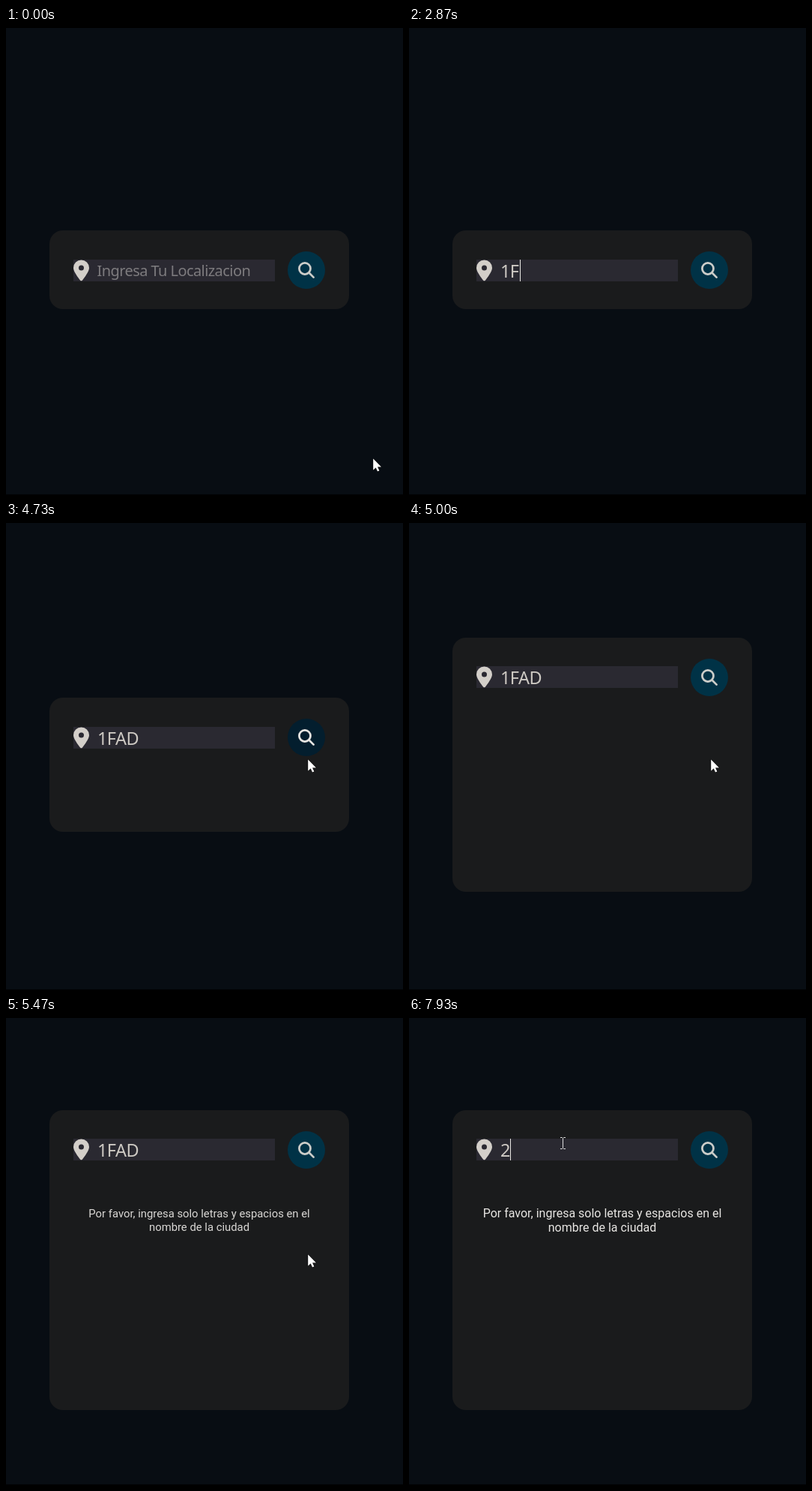
These frames come from a looping animation (530x623 px, 8 s). An HTML page:

```html
<!DOCTYPE html>
<html lang="es">
<head>
<meta charset="utf-8">
<title>Buscador</title>
<style>
html, body { margin: 0; width: 100%; height: 100%; overflow: hidden; background: #080d13; }
svg { display: block; width: 530px; height: 623px; cursor: default; user-select: none; }
.field { font-family: "Noto Sans", "Open Sans", sans-serif; }
#hint { font-size: 20px; letter-spacing: -0.57px; fill: #7d7b7e; }
#value { font-size: 23.5px; letter-spacing: -0.6px; fill: #cdc9c3; }
#error { font: 16px Roboto, sans-serif; fill: #e8e6e3; text-anchor: middle; }
.pointer path { fill: #fff; stroke: #000; stroke-width: 1; paint-order: stroke; stroke-linejoin: round; }
</style>
</head>
<body>
<svg viewBox="0 0 530 623">
  <rect width="530" height="623" fill="#080d13"/>
  <rect y="622" width="530" height="1" fill="#020305"/>
  <rect id="card" x="58" width="400" rx="18" fill="#1a1b1c"/>

  <g id="input">
    <rect x="90" width="269" height="29" fill="#2a2931"/>
    <rect id="selection" x="122" width="55" height="29" fill="#004daa"/>
    <path transform="translate(90 .4) scale(.0547)" fill="#d3cfc9" fill-rule="evenodd"
      d="M216 499C267 435 384 279 384 192A192 192 0 0 0 0 192C0 279 117 435 168 499C181 515 204 515 216 499ZM192 128a64 64 0 1 1 0 128a64 64 0 1 1 0-128Z"/>
    <text id="hint" class="field" x="121.5" y="22">Ingresa Tu Localizacion</text>
    <text id="value" class="field" x="122" y="24"></text>
    <rect id="caret" width="1" height="29" fill="#e8e6e3"/>
  </g>

  <g id="button">
    <circle id="disc" cx="401" cy="25" r="25"/>
    <g id="lens" transform="translate(390 14)" fill="none" stroke-width="2.75" stroke-linecap="round">
      <circle cx="8.95" cy="8.95" r="7.55"/>
      <path d="M14.5 14.5L20.6 20.6"/>
    </g>
  </g>

  <g id="error">
    <text y="-3.5">Por favor, ingresa solo letras y espacios en el</text>
    <text y="15.5">nombre de la ciudad</text>
  </g>

  <g id="pointer" class="pointer">
    <path id="arrow" d="M.2 .5V15.8L3.7 12.5L6 17.5L8.4 16.4L6.1 11.5H11Z"/>
    <path id="hand" d="M-1.5 1Q0-1 1.5 1V7L8.5 8.5Q10.5 9 10.5 11V15L8.5 21H-1L-6.5 13.5Q-6.5 11-4 12L-1.5 14Z"/>
    <g id="beam" fill="none">
      <path d="M-3 -7.5H-.5L.5 -6.5L1.5 -7.5H4M.5 -6.5V6.5M-3 7.5H-.5L.5 6.5L1.5 7.5H4"
        style="fill:none;stroke:#dcdcdc;stroke-width:1"/>
    </g>
  </g>
</svg>
<script>
const LOOP = 8000, MIDDLE = 322.5;
const OPEN = 4634, ERROR = OPEN + 500;

// [start, text]
const typed = [[0, ""], [2530, "1"], [2870, "1F"], [3270, "1FA"], [3470, "1FAD"], [7930, "2"]];
// [on, off, x]
const blinks = [
  [470, 1000, 122], [1470, 2070, 122], [2530, 2600, 135], [2870, 3130, 148],
  [3270, 3470, 161], [3470, 3670, 177], [4200, 4600, 177], [6930, 7130, 177], [7930, 8000, 135]
];
// [time, x, y]
const track = [
  [0, 490, 574], [420, 255, 323], [4000, 255, 323], [4070, 269, 311], [4530, 403, 315],
  [5870, 403, 315], [6200, 200, 187], [6470, 200, 187], [6600, 205, 167], [8000, 205, 167]
];

const ids = "card input selection hint value caret button disc lens error pointer arrow hand beam".split(" ");
const el = Object.fromEntries(ids.map(id => [id, document.getElementById(id)]));

const clamp = v => Math.min(1, Math.max(0, v));
const span = (t, start, length) => clamp((t - start) / length);
const smooth = u => u * u * (3 - 2 * u);
const set = (node, name, value) => node.setAttribute(name, value);
const show = (node, on) => set(node, "visibility", on ? "inherit" : "hidden");
const mix = (a, b, u) => `rgb(${a.map((v, i) => Math.round(v + (b[i] - v) * u))})`;

function bezier(x1, y1, x2, y2) {
  const at = (a, b, s) => 3 * (1 - s) * (1 - s) * s * a + 3 * (1 - s) * s * s * b + s * s * s;
  return x => {
    if (x <= 0 || x >= 1) return clamp(x);
    let lo = 0, hi = 1;
    for (let i = 0; i < 24; i++) {
      const mid = (lo + hi) / 2;
      if (at(x1, x2, mid) < x) lo = mid; else hi = mid;
    }
    return at(y1, y2, lo);
  };
}
const ease = bezier(.25, .1, .25, 1);
const easeOut = bezier(0, 0, .58, 1);

function step(t) {
  const time = k => 10 * Math.round(k * 100 / 15);
  let k = Math.floor((t + 4) * .015);
  if (time(k) > t) k--;
  return time(k);
}

function mouseAt(t) {
  let i = 1;
  while (i < track.length - 1 && track[i][0] < t) i++;
  const [t0, x0, y0] = track[i - 1], [t1, x1, y1] = track[i];
  const u = smooth(span(t, t0, t1 - t0));
  return [Math.round(x0 + (x1 - x0) * u), Math.round(y0 + (y1 - y0) * u)];
}

function drawField(t, y) {
  const text = typed.filter(([start]) => t >= start).pop()[1];
  const blink = blinks.find(([on, off]) => t >= on && t < off);
  const selected = t >= 7130 && t < 7930;
  set(el.input, "transform", `translate(0 ${y})`);
  el.value.textContent = text;
  el.value.style.fill = selected ? "#e8e6e3" : "";
  show(el.hint, !text);
  show(el.selection, selected);
  show(el.caret, blink);
  if (blink) set(el.caret, "x", blink[2]);
}

function drawButton(t, y) {
  const hover = ease(span(t, 4320, 200)) * (1 - ease(span(t, 4710, 300)));
  set(el.button, "transform", `translate(0 ${y})`);
  set(el.disc, "fill", mix([0, 50, 70], [3, 29, 45], hover));
  set(el.lens, "stroke", mix([204, 205, 201], [232, 230, 227], hover));
}

function drawError(t) {
  const u = ease(span(t, ERROR, 500));
  show(el.error, u > 0);
  set(el.error, "transform", `translate(258 269.5) scale(${u})`);
  set(el.error, "opacity", u);
}

function drawPointer(t, inputY, buttonY) {
  const [x, y] = mouseAt(t);
  const onInput = x >= 112 && x < 359 && y >= inputY && y < inputY + 29;
  const onButton = Math.hypot(x - 401, y - buttonY - 25) < 25;
  set(el.pointer, "transform", `translate(${x} ${y})`);
  show(el.pointer, t < 2530 || t >= 4070);
  show(el.beam, onInput);
  show(el.hand, onButton);
  show(el.arrow, !onInput && !onButton);
}

function draw(t) {
  const height = 105 + 295 * easeOut(span(t, OPEN, 600));
  const top = MIDDLE - height / 2;
  const cardY = Math.round(top);
  const inputY = Math.round(top + 38.5);
  const buttonY = Math.round(top + 28);
  set(el.card, "y", cardY);
  set(el.card, "height", Math.round(top + height) - cardY);
  drawField(t, inputY);
  drawButton(t, buttonY);
  drawError(t);
  drawPointer(t, inputY, buttonY);
}

const begin = performance.now();
function tick() {
  draw(step((performance.now() - begin) % LOOP));
  requestAnimationFrame(tick);
}
tick();
</script>
</body>
</html>
```
